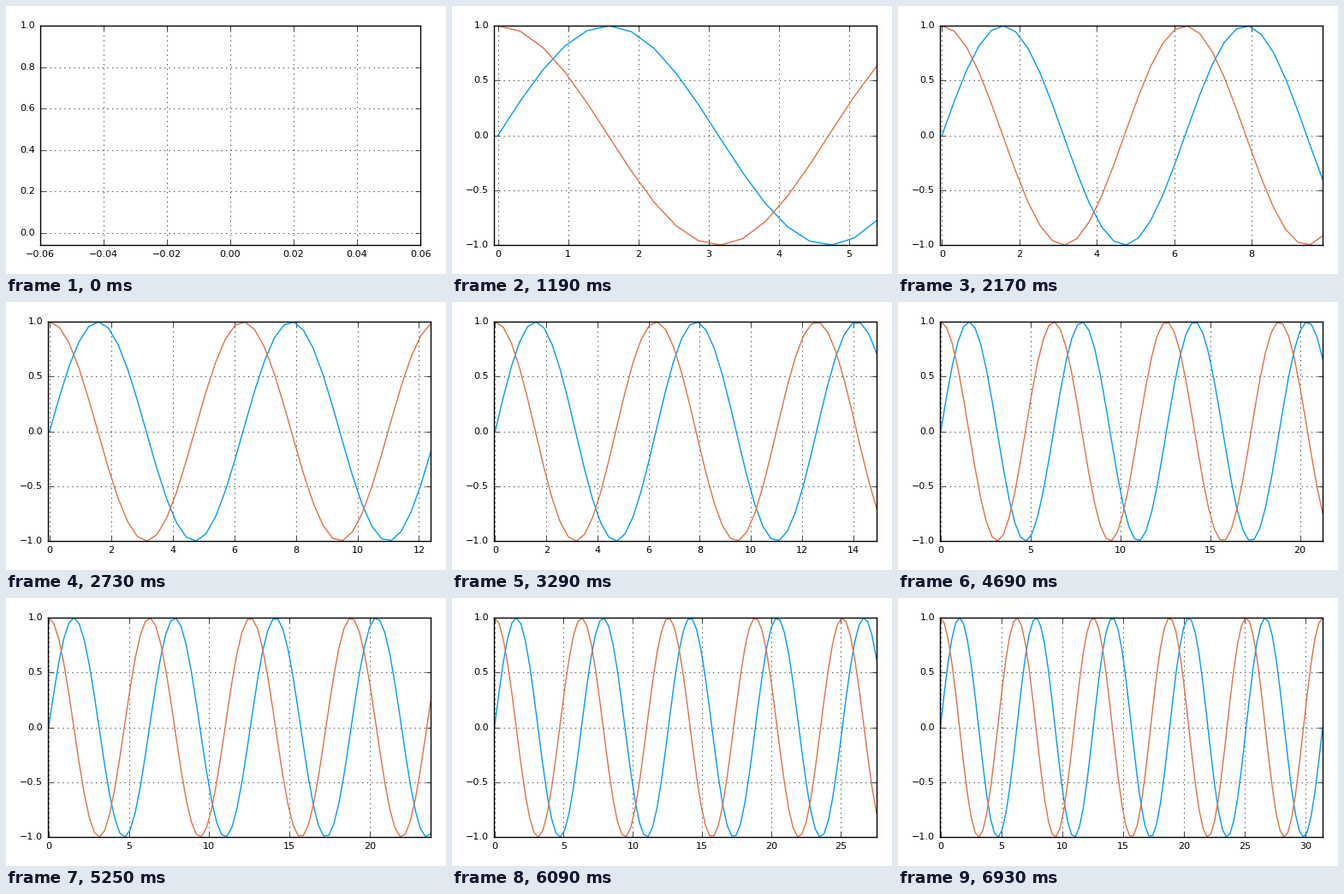
Write a matplotlib script that moves like this. It is 514 px wide and 314 px high and loops after 7000 ms.

```python
import math

import matplotlib.pyplot as plt
import numpy as np
from matplotlib.animation import FuncAnimation

WIDTH, HEIGHT, DPI = 514, 314, 100
FRAMES, INTERVAL = 100, 70
LEFT, RIGHT = 39.8, 496.0
BOTTOM, TOP = 33.85, 290.85
FONT_PT = 8
EM = FONT_PT * DPI / 72
DIGIT, DOT, MINUS, BEARING = 0.636 * EM, 0.318 * EM, 0.8 * EM, 0.045 * EM
PAD = 0.06      # smallest extent of the view around zero
MAX_BINS = 9

plt.rcParams["font.family"] = "DejaVu Sans"
plt.rcParams["ytick.alignment"] = "center"

x = np.linspace(0, 10 * math.pi, FRAMES)
waves = np.sin(x), np.cos(x)

fig = plt.figure(figsize=(WIDTH / DPI, HEIGHT / DPI), dpi=DPI, facecolor="white")
ax = fig.add_axes([0.1, 0.1, 0.8, 0.8])
ax.set_axisbelow(True)
ax.grid(True, color="black", linewidth=0.5, linestyle=(0, (2, 6)), alpha=1)
ax.tick_params(direction="in", length=4, width=0.5, pad=4, labelsize=FONT_PT,
               color="black", top=True, right=True)
for spine in ax.spines.values():
    spine.set_linewidth(1)

lines = [ax.plot([], [], color=c, linewidth=1)[0] for c in ("#009afa", "#e36f47")]


def pick_ticks(lo, hi, pixels):
    """Return round tick values inside the view, and their labels."""
    raw = (hi - lo) / MAX_BINS
    scale = 10.0 ** math.floor(math.log10(raw))
    for factor in (1, 2, 5, 10):
        step = factor * scale
        first = math.floor(lo / step + 1e-9)
        if step >= raw and (first + MAX_BINS) * step >= hi - 1e-9:
            break
    slack = 0.5 * (hi - lo) / pixels
    ticks = [n * step for n in range(first, first + MAX_BINS + 1)
             if lo - slack <= n * step <= hi + slack]
    places = max(0, -math.floor(math.log10(step) + 1e-9))
    labels = [f"{t:.{places}f}".replace("-", "\u2212") for t in ticks]
    return ticks, labels


def ink_width(label):
    """Width of a positive number without its outer side bearings."""
    return sum(DOT if ch == "." else DIGIT for ch in label) - 2 * BEARING


def update(i):
    n = i + 1
    for line, wave in zip(lines, waves):
        line.set_data(x[:n], wave[:n])

    x_lo, x_hi = -PAD, max(PAD, x[i])
    y_lo, y_hi = min(-PAD, *(w[:n].min() for w in waves)), 1.0

    y_ticks, y_labels = pick_ticks(y_lo, y_hi, TOP - BOTTOM)
    left = LEFT + (MINUS if y_ticks[0] < -1e-9 else 0)
    x_ticks, x_labels = pick_ticks(x_lo, x_hi, RIGHT - left)

    # The plot gives way when the last label would stick out on the right.
    gap = (x_hi - x_ticks[-1]) * (RIGHT - left) / (x_hi - x_lo)
    right = RIGHT - max(0, ink_width(x_labels[-1]) / 2 - gap)

    ax.set_position([left / WIDTH, BOTTOM / HEIGHT,
                     (right - left) / WIDTH, (TOP - BOTTOM) / HEIGHT])
    ax.set_xticks(x_ticks, labels=x_labels)
    ax.set_yticks(y_ticks, labels=y_labels)
    ax.set_xlim(min(x_lo, x_ticks[0]), max(x_hi, x_ticks[-1]))
    ax.set_ylim(min(y_lo, y_ticks[0]), max(y_hi, y_ticks[-1]))
    return lines


anim = FuncAnimation(fig, update, frames=FRAMES, interval=INTERVAL,
                     repeat=True, repeat_delay=0)
plt.show()
```
